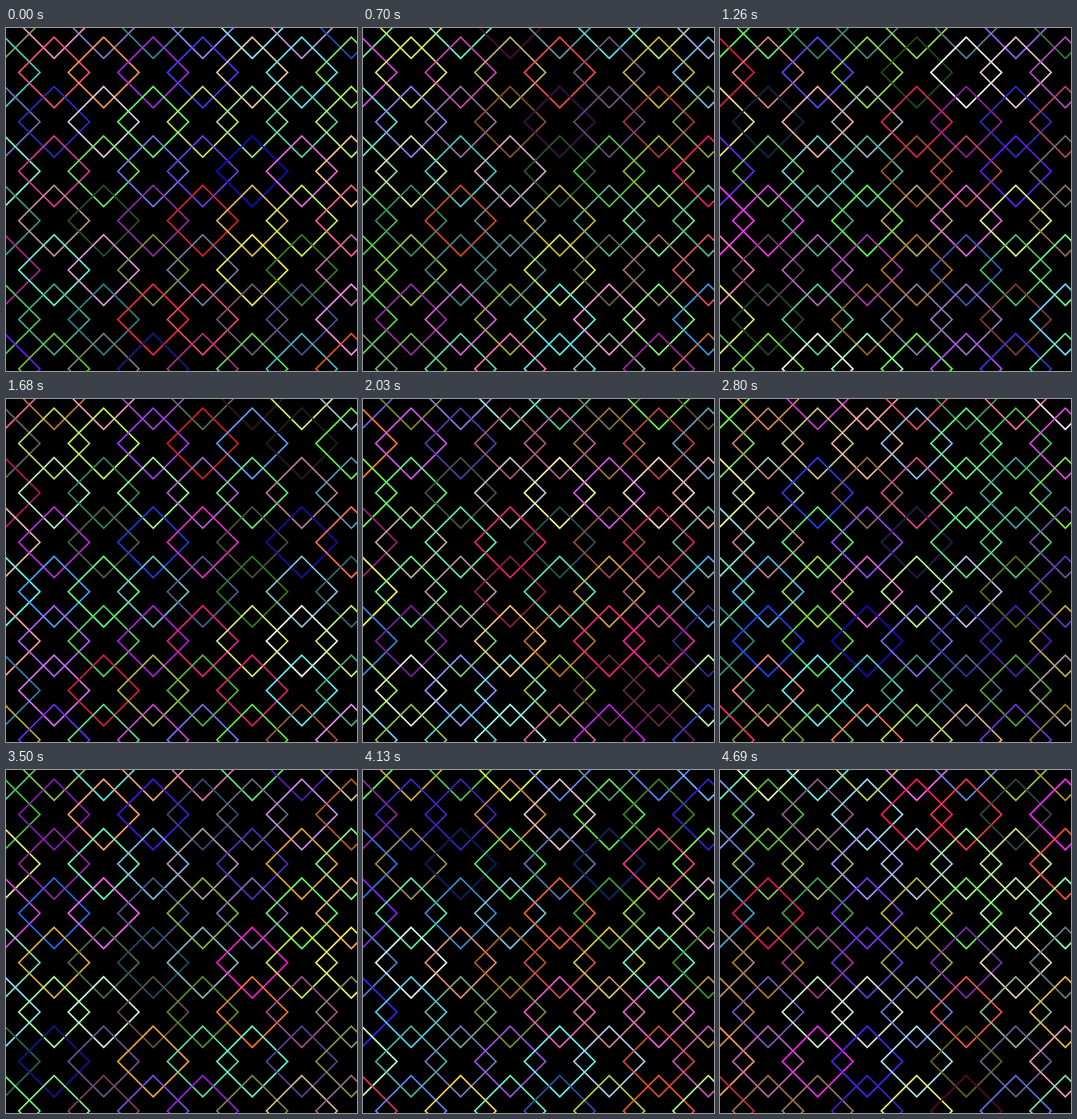
These frames come from a looping animation (496 by 486 pixels, 4760 ms). An HTML page with a canvas:

```html
<!DOCTYPE html>
<html lang="en">
<head>
<meta charset="utf-8">
<title>Diamond lattice</title>
<style>
  html, body { margin: 0; width: 100%; height: 100%; overflow: hidden; background: #000; }
  canvas { display: block; }
</style>
</head>
<body>
<canvas id="stage" width="496" height="486"></canvas>
<script>
const ctx = document.getElementById('stage').getContext('2d');
const TICK = 70, TICKS = 68;
const PITCH = 70, RADIUS = 50, LEFT = -2, TOP = -7, COUNT = 8;

// Ticks on which every diamond takes a new colour, as [first, count] runs.
const RUNS = [[0, 4], [6, 3], [10, 1], [13, 2], [18, 1], [20, 8], [29, 1], [32, 3], [36, 2],
              [40, 1], [43, 2], [47, 7], [55, 1], [59, 2], [62, 2], [65, 3]];
const changes = RUNS.flatMap(([first, n]) => Array.from({ length: n }, (_, i) => first + i));

function seededRandom(seed) {
  let s = Math.imul(seed + 1, 0x9E3779B1);
  return () => {
    s = (s + 0x6D2B79F5) | 0;
    let t = Math.imul(s ^ (s >>> 15), 1 | s);
    t = (t + Math.imul(t ^ (t >>> 7), 61 | t)) ^ t;
    return ((t ^ (t >>> 14)) >>> 0) / 4294967296;
  };
}

// Strong greens are softened with some red and blue.
function randomColor(random) {
  const channel = () => 20 + 235 * random();
  const g = channel();
  const r = Math.max(channel(), g * 0.4);
  const b = Math.max(channel(), g * 0.3);
  return [r, g, b].map(Math.round);
}

function strokeDiamond(x, y, color, width) {
  ctx.beginPath();
  ctx.moveTo(x, y - RADIUS);
  ctx.lineTo(x + RADIUS, y);
  ctx.lineTo(x, y + RADIUS);
  ctx.lineTo(x - RADIUS, y);
  ctx.closePath();
  ctx.strokeStyle = color;
  ctx.lineWidth = width;
  ctx.stroke();
}

function drawLattice(seed) {
  const random = seededRandom(seed);
  ctx.fillStyle = '#000';
  ctx.fillRect(0, 0, 496, 486);
  for (let row = 0; row < COUNT; row++) {
    for (let col = 0; col < COUNT; col++) {
      const x = LEFT + col * PITCH, y = TOP + row * PITCH;
      const [r, g, b] = randomColor(random);
      strokeDiamond(x, y, `rgb(${r},${g},${b})`, 2.3);
      // Dark diamonds read as a fine double line.
      if (0.3 * r + 0.59 * g + 0.11 * b < 55) strokeDiamond(x, y, '#000', 0.8);
    }
  }
}

let shown = -1;
function render() {
  const tick = Math.floor(performance.now() / TICK) % TICKS;
  const current = changes.filter(t => t <= tick).pop();
  if (current !== shown) drawLattice(shown = current);
  requestAnimationFrame(render);
}
render();
</script>
</body>
</html>
```
